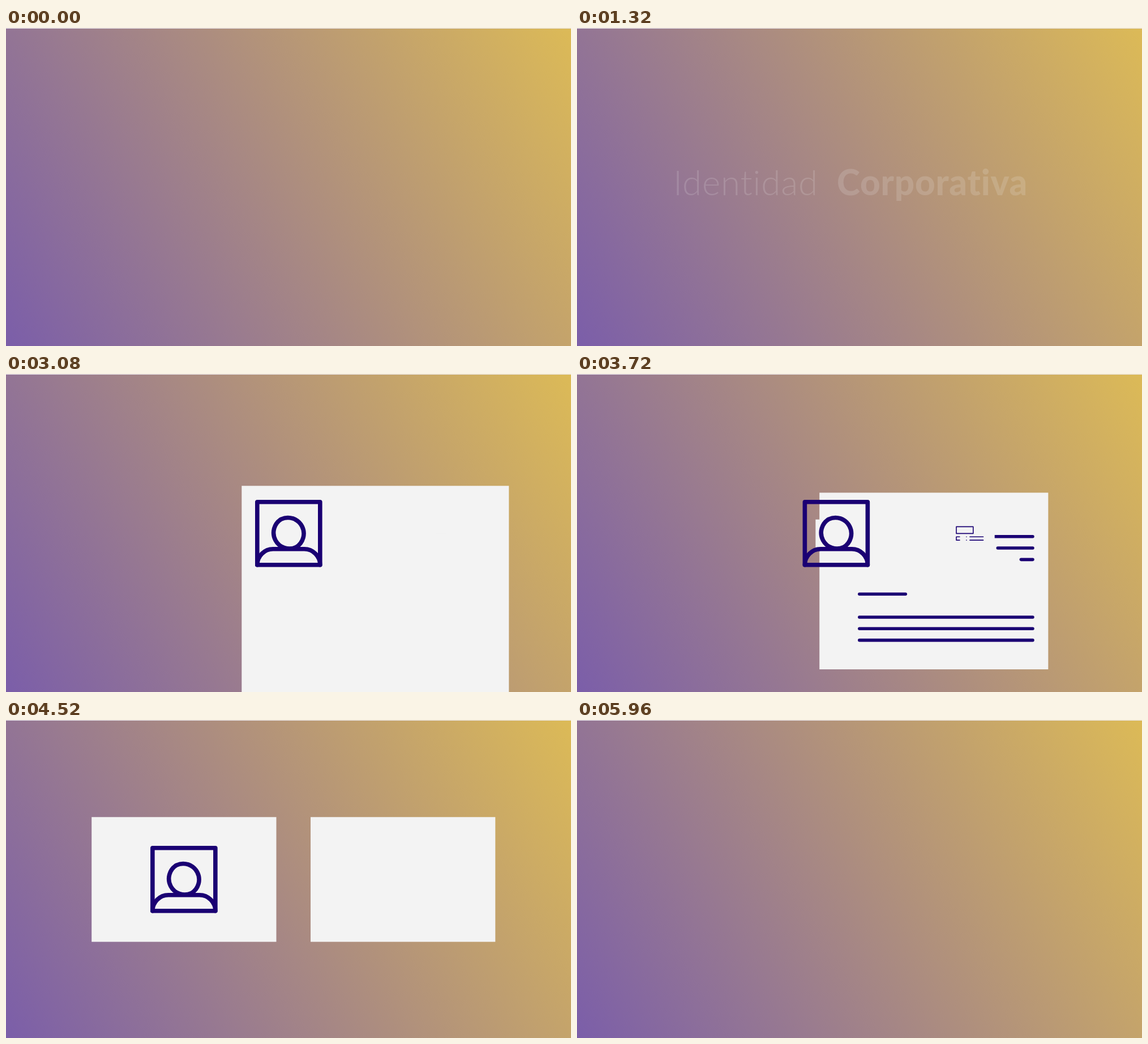
Animation, 998 px wide and 561 px high, one loop 6.68 s. Source, as an HTML page:

```html
<!DOCTYPE html>
<html lang="es">
<head>
<meta charset="utf-8">
<title>Identidad Corporativa</title>
<style>
html, body { margin: 0; width: 100%; height: 100%; overflow: hidden; }
body { background: linear-gradient(60deg, #7b5ea9, #dcba57); }
svg { display: block; width: 100%; height: 100%; }
text { font: 300 62px Lato, "Open Sans", sans-serif; fill: #f3f3f3; letter-spacing: .8px; }
.bold { font-weight: 800; }
.sheet { fill: #f3f3f3; }
.ink path { fill: none; stroke: #1a0073; stroke-width: 7.6; stroke-linecap: round; stroke-linejoin: round; }
#letter path { stroke-width: 6.5; }
</style>
</head>
<body>
<svg viewBox="0 0 998 561">
  <rect width="998" height="1" fill="#eceaf0"/>
  <g id="title">
    <text x="170" y="295">Identidad</text>
    <text class="bold" x="459" y="295">Corporativa</text>
  </g>
  <g id="letter" class="ink">
    <rect class="sheet" x="-83" y="-84" width="472" height="364"/>
    <g id="lines"></g>
    <rect class="sheet" x="260" y="0" width="18.5" height="13"/>
  </g>
  <g id="left"><rect class="sheet" x="-170.5" y="-115" width="341" height="230"/></g>
  <g id="right" class="ink">
    <rect class="sheet" x="-170.5" y="-115" width="341" height="230"/>
    <g id="details">
      <path d="M-119 -55.5H20V.5H-119Z"/>
      <path d="M-91.5 27.5H-119V55.5H-91.5"/>
      <path d="M-35.5 27.5h.01"/>
      <path d="M-35.5 55.5h.01"/>
      <path d="M-7.5 27.5H103"/>
      <path d="M-7.5 55.5H103"/>
    </g>
  </g>
  <g id="icon" class="ink">
    <path d="M0 55.5H-55.5V-55.5H55.5V55.5Z"/>
    <path d="M-55.5 55.5A28 28 0 0 1 -27.5 27.5H27.5A28 28 0 0 1 55.5 55.5"/>
    <path d="M13.1 24.2A28 28 0 0 1 -13.1 -25.2A28 28 0 0 1 13.1 24.2"/>
  </g>
</svg>
<script>
const LOOP = 6680, STEP = 40;
const CX = 499.3, CY = 281.3;
const el = id => document.getElementById(id);
const clamp = x => Math.max(0, Math.min(1, x));
const ramp = (t, a, b) => clamp((t - a) / (b - a));
const smooth = x => (1 - Math.cos(Math.PI * x)) / 2;
const mix = (a, b, f) => a + (b - a) * f;

// Letter text lines: start x, end x, y, relative to the icon centre
el('lines').innerHTML = [
  [275, 357, 6.4], [285, 357, 30.1], [333, 357, 53.8], [-0.5, 94.6, 125],
  [-0.5, 357, 172.5], [-0.5, 357, 196.2], [-0.5, 357, 220]
].map(([a, b, y]) => `<path d="M${a} ${y}H${b}"/>`).join('');

const paths = id => [...el(id).querySelectorAll('path')];
const lines = paths('lines'), details = paths('details'), strokes = paths('icon');
const lengths = strokes.map(p => p.getTotalLength());
const total = lengths.reduce((a, b) => a + b);

function trace(path, f) {
  const len = path.getTotalLength();
  path.style.visibility = f > 0 ? 'visible' : 'hidden';
  path.style.strokeDasharray = f < 1 ? `${f * len} ${len * 2 + 9}` : 'none';
}

function place(id, x, y, scale = 1) {
  el(id).setAttribute('transform', `translate(${x} ${y}) scale(${scale})`);
  el(id).style.visibility = scale > 0 ? '' : 'hidden';
}

function drawIcon(f) {
  let rest = f * total;
  strokes.forEach((path, i) => {
    trace(path, clamp(rest / lengths[i]));
    rest -= lengths[i];
  });
}

function render(t) {
  const shown = ramp(t, 360, 880);
  place('title', 0, 44 * (1 - shown));
  el('title').style.opacity = Math.min(shown, 1 - ramp(t, 900, 1400));

  drawIcon(Math.min(ramp(t, 1380, 2669), 1 - ramp(t, 5090, 5930)));

  const grow = ramp(t, 2400, 3080), shrink = ramp(t, 3620, 3994) ** 1.47;
  place('letter', CX, CY, Math.min(grow, 1 - shrink));
  const written = shrink < 1 ? ramp(t, 3080, 3420) : 0;
  lines.forEach(p => trace(p, written));

  const open = Math.min(smooth(ramp(t, 3603, 3985)), 1 - smooth(ramp(t, 4440, 5040)));
  const x = mix(CX, 306, open);
  place('icon', x, CY);
  place('left', x, CY, open);
  place('right', mix(693.9, 701.5, open), CY, open);
  const kept = open > 0 ? 1 - ramp(t, 4160, 4440) : 0;
  details.forEach(p => trace(p, kept));
}

function tick() {
  const t = performance.now() % LOOP;
  render(Math.floor(t / STEP) * STEP);
  requestAnimationFrame(tick);
}
tick();
</script>
</body>
</html>
```
